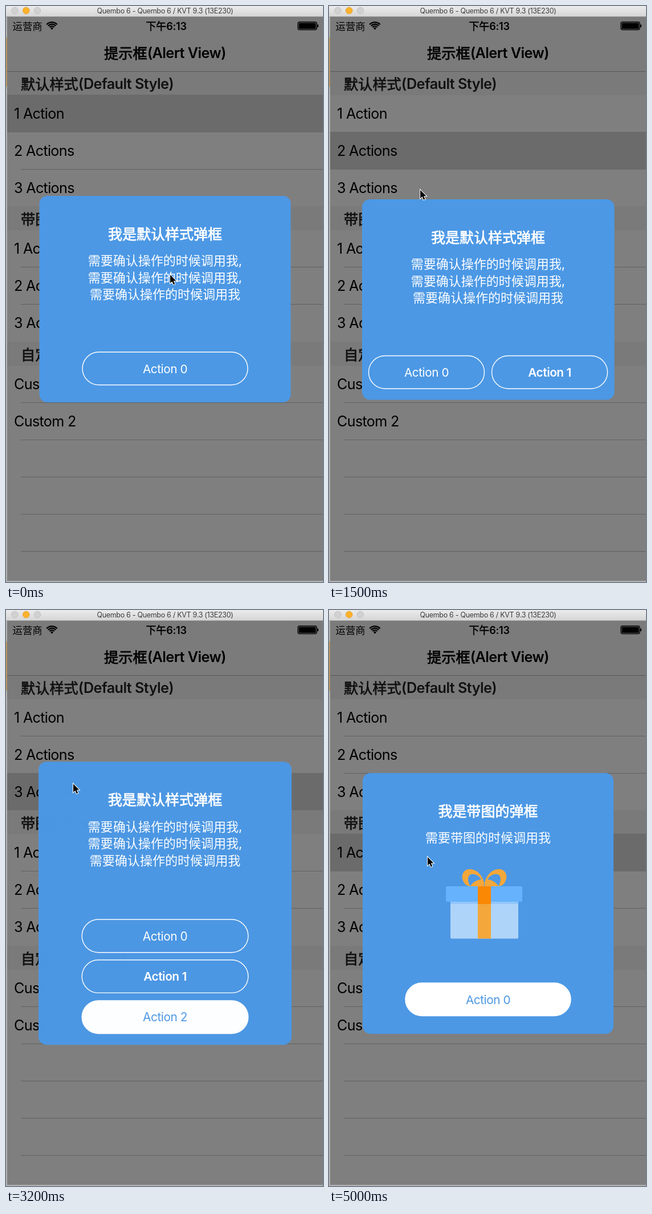
Write an HTML page with a canvas that moves like this. It is 556 by 1007 pixels and loops after 5100 ms.

```html
<!DOCTYPE html>
<html lang="zh-CN">
<head>
<meta charset="utf-8">
<style>
html, body { margin: 0; width: 100%; height: 100%; overflow: hidden; background: #fff; }
canvas { display: block; }
</style>
</head>
<body>
<canvas id="stage" width="556" height="1007"></canvas>
<script>
const ctx = document.getElementById('stage').getContext('2d');
const LOOP = 5100, STEP = 100, CX = 279;
const BLUE = '#4c98e5', WHITE = '#fff';
const MESSAGE = ['需要确认操作的时候调用我,', '需要确认操作的时候调用我,', '需要确认操作的时候调用我'];

const sections = [
  { y: 114, title: '默认样式(Default Style)', rows: ['1 Action', '2 Actions', '3 Actions'] },
  { y: 350, title: '带图的(Image Style)', rows: ['1 Action', '2 Action', '3 Action'] },
  { y: 587, title: '自定义(Custom)', rows: ['Custom 1', 'Custom 2', '', '', '', ''] }
];

// row: section and row index of the list entry that opens the dialog
// Each button: label, x, y, width, style
const dialogs = [
  { open: -1000, close: 600, row: [0, 0], x: 58.5, y: 332, w: 441, h: 361,
    title: '我是默认样式弹框', lines: MESSAGE,
    buttons: [['Action 0', 134, 605, 290, 'line']] },
  { open: 1260, close: 2270, row: [0, 1], x: 58, y: 338, w: 442.5, h: 350.5,
    title: '我是默认样式弹框', lines: MESSAGE,
    buttons: [['Action 0', 69.5, 611.5, 203, 'line'], ['Action 1', 285.5, 611.5, 203, 'bold']] },
  { open: 3005, close: 4090, row: [0, 2], x: 57.5, y: 265.7, w: 443, h: 494,
    title: '我是默认样式弹框', lines: MESSAGE,
    buttons: [['Action 0', 133.5, 541, 291, 'line'], ['Action 1', 133.5, 611.5, 291, 'bold'],
      ['Action 2', 133.5, 682.5, 291, 'solid']] },
  { open: 4770, close: 9999, row: [1, 0], x: 59, y: 285, w: 440, h: 456,
    title: '我是带图的弹框', lines: ['需要带图的时候调用我'], gift: true,
    buttons: [['Action 0', 134, 652, 290, 'solid']] }
];

// Pointer path: time, x, y
const path = [
  [0, 288, 470], [350, 316, 634], [600, 318, 640], [800, 136, 378], [1050, 112, 258], [1400, 112, 258],
  [2000, 401, 640], [2300, 401, 640], [2750, 118, 304], [3250, 118, 304], [3900, 321, 619],
  [4000, 325, 640], [4150, 325, 640], [4600, 143, 424], [4750, 143, 424], [5000, 173, 432]
];
const clicks = [[500, 600], [1100, 1200], [2100, 2200], [2900, 3000], [4000, 4100], [4700, 4800]];

const clamp = v => Math.max(0, Math.min(1, v));
const easeOut = v => 1 - (1 - v) ** 3;
const easeInOut = v => v < .5 ? 2 * v * v : 1 - 2 * (1 - v) ** 2;

function rect(x, y, w, h, color) {
  ctx.fillStyle = color;
  ctx.fillRect(x, y, w, h);
}

function round(x, y, w, h, r, fill, stroke) {
  ctx.beginPath();
  ctx.roundRect(x, y, w, h, r);
  if (fill) { ctx.fillStyle = fill; ctx.fill(); }
  if (stroke) { ctx.strokeStyle = stroke; ctx.lineWidth = 1.4; ctx.stroke(); }
}

function disc(x, y, r, fill, stroke) {
  round(x - r, y - r, 2 * r, 2 * r, r, fill);
  ctx.strokeStyle = stroke;
  ctx.lineWidth = .8;
  ctx.stroke();
}

// y is the middle of the capital letters. Chinese runs are untracked and get
// their medium weight from a thin outline.
function text(str, x, y, size, { color = '#000', weight = 400, align = 'left', spacing = 0 } = {}) {
  const runs = (str.match(/[\u4e00-\u9fff]+|[^\u4e00-\u9fff]+/g) || []).map(part => {
    const han = part >= '\u4e00';
    const font = han ? `400 ${size}px "Noto Sans CJK SC", sans-serif` : `${weight} ${size}px Inter, sans-serif`;
    const track = han ? '0px' : spacing + 'px';
    ctx.font = font;
    ctx.letterSpacing = track;
    return { part, han, font, track, width: ctx.measureText(part).width };
  });
  if (align === 'center') x -= runs.reduce((sum, run) => sum + run.width, 0) / 2;
  ctx.fillStyle = ctx.strokeStyle = color;
  ctx.lineWidth = size * .03;
  for (const run of runs) {
    const base = y + size * (run.han ? .38 : .364);
    ctx.font = run.font;
    ctx.letterSpacing = run.track;
    ctx.fillText(run.part, x, base);
    if (run.han && weight > 400) ctx.strokeText(run.part, x, base);
    x += run.width;
  }
}

function drawWindow() {
  rect(0, 0, 556, 1007, '#b4b4b4');
  rect(0, 55, 2, 86, '#b8975f');
  const bar = ctx.createLinearGradient(0, 0, 0, 18);
  bar.addColorStop(0, '#ebebeb');
  bar.addColorStop(1, '#d6d6d6');
  rect(0, 0, 556, 18, bar);
  rect(0, 18, 556, 1, '#a5a5a5');
  disc(15.5, 8, 5.8, '#d2d1d2', '#bdbcbd');
  disc(35.3, 8, 5.8, '#fdb22b', '#e09b22');
  disc(55, 8, 5.8, '#d2d1d2', '#bdbcbd');
  text('Quembo 6 - Quembo 6 / KVT 9.3 (13E230)', CX, 8.5, 12.4, { color: '#3c3c3c', align: 'center', spacing: -.25 });
}

function drawStatus() {
  text('运营商', 11.5, 35, 17.4);
  text('下午6:13', 281, 35, 18, { weight: 600, align: 'center', spacing: -.2 });
  ctx.strokeStyle = '#000';
  ctx.lineWidth = 2.4;
  for (const r of [5.6, 9.2, 12.6]) {
    ctx.beginPath();
    ctx.arc(80.5, 41, r, -Math.PI * .76, -Math.PI * .24);
    ctx.stroke();
  }
  ctx.beginPath();
  ctx.moveTo(80.5, 41.5);
  ctx.arc(80.5, 41, 3.2, -Math.PI * .78, -Math.PI * .22);
  ctx.fillStyle = '#000';
  ctx.fill();
  round(512, 28, 33, 13.5, 3, null, '#000');
  round(513.5, 29.5, 30, 10.5, 1.5, '#000');
  round(546, 32.3, 2, 5, 1, '#000');
}

function drawList([activeSection, activeRow]) {
  rect(2, 19, 554, 986, WHITE);
  sections.forEach(({ y, title, rows }, s) => {
    rect(2, y, 554, 42, '#f5f5f5');
    text(title, 26, y + 22, 25.2, { weight: 600, color: '#222', spacing: -.55 });
    rows.forEach((label, i) => {
      const top = y + 42 + i * 65, active = s === activeSection && i === activeRow;
      if (active) rect(2, top - 1, 554, 66, '#d8d8d8');
      else if (i < rows.length - 1) rect(26, top + 64, 530, 1, '#c4c4c6');
      text(label, 14, top + 31.5, 25.2, { spacing: -.7 });
    });
  });
  rect(2, 19, 554, 95, '#f8f8f8');
  rect(2, 114, 554, 1, '#b0b0b2');
  drawStatus();
  text('提示框(Alert View)', CX, 82, 25.2, { weight: 600, align: 'center', spacing: -.55 });
}

function drawGift() {
  const bow = new Path2D('M272 476C268 462 258 453 247 453C236 453 231 464 235 473C238 480 242 483 250 483H272Z' +
    'M248 482.5C242 474 243 463 250 462C258 461 264 466 267 471C259 472 252 476 248 482.5Z');
  for (const side of [1, -1]) {
    ctx.save();
    ctx.translate(272.5, 0);
    ctx.scale(side, 1);
    ctx.translate(-272.5, 0);
    ctx.fillStyle = '#f4a73a';
    ctx.fill(bow, 'evenodd');
    ctx.restore();
  }
  round(213, 505, 119, 69.5, 2.5, '#afd4fa');
  rect(213, 510, 119, 4, '#92c6fb');
  round(205, 483, 134, 27, 2.5, '#66b2fd');
  rect(261, 510, 23, 64.5, '#f4a73a');
  rect(261, 483, 23, 31, '#fb8804');
}

function drawDialog(d, t) {
  const shown = easeOut(clamp((t - d.open) / 250));
  const gone = easeInOut(clamp((t - d.close) / 200));
  if (t < d.open || gone === 1) return;
  rect(2, 19, 554, 986, `rgba(0,0,0,${.5 * (1 - gone)})`);

  const cy = d.y + d.h / 2, scale = 1.2 - .2 * shown;
  ctx.save();
  ctx.globalAlpha = shown * (1 - gone);
  ctx.translate(CX, cy);
  ctx.scale(scale, scale);
  ctx.translate(-CX, -cy);
  round(d.x, d.y, d.w, d.h, 14, BLUE);
  text(d.title, CX, d.y + 66.3, 25, { color: WHITE, weight: 500, align: 'center' });
  d.lines.forEach((line, i) =>
    text(line, CX, d.y + 112.8 + i * 29.6, 22, { color: WHITE, align: 'center' }));
  if (d.gift) drawGift();
  for (const [label, x, y, w, style] of d.buttons) {
    const solid = style === 'solid';
    round(x, y, w, 57.5, 28.75, solid && WHITE, WHITE);
    text(label, x + w / 2, y + 29, 20.7, {
      color: solid ? BLUE : WHITE, weight: style === 'bold' ? 600 : 400, align: 'center', spacing: -.4
    });
  }
  ctx.restore();
}

function drawPointer(t) {
  const next = path.findIndex(p => p[0] > t);
  const b = next < 0 ? path.at(-1) : path[next], a = next < 0 ? b : path[next - 1];
  const k = clamp((t - a[0]) / (b[0] - a[0] || 1));
  ctx.save();
  ctx.translate(a[1] + (b[1] - a[1]) * k, a[2] + (b[2] - a[2]) * k);
  if (clicks.some(([from, to]) => t >= from && t < to)) {
    ctx.beginPath();
    ctx.arc(1, 2, 20.5, 0, 7);
    ctx.strokeStyle = '#000';
    ctx.lineWidth = 3;
    ctx.stroke();
  }
  const arrow = new Path2D('M0 0V14.5L3.4 11.4L5.8 17L8.2 16L5.8 10.5H10.4Z');
  ctx.strokeStyle = WHITE;
  ctx.lineWidth = 2;
  ctx.stroke(arrow);
  ctx.fillStyle = '#000';
  ctx.fill(arrow);
  ctx.restore();
}

function frame(now) {
  const t = Math.floor(now % LOOP / STEP) * STEP;
  drawWindow();
  drawList(dialogs.findLast(d => d.open <= t).row);
  dialogs.forEach(d => drawDialog(d, t));
  drawPointer(t);
  requestAnimationFrame(frame);
}
requestAnimationFrame(frame);
</script>
</body>
</html>
```
